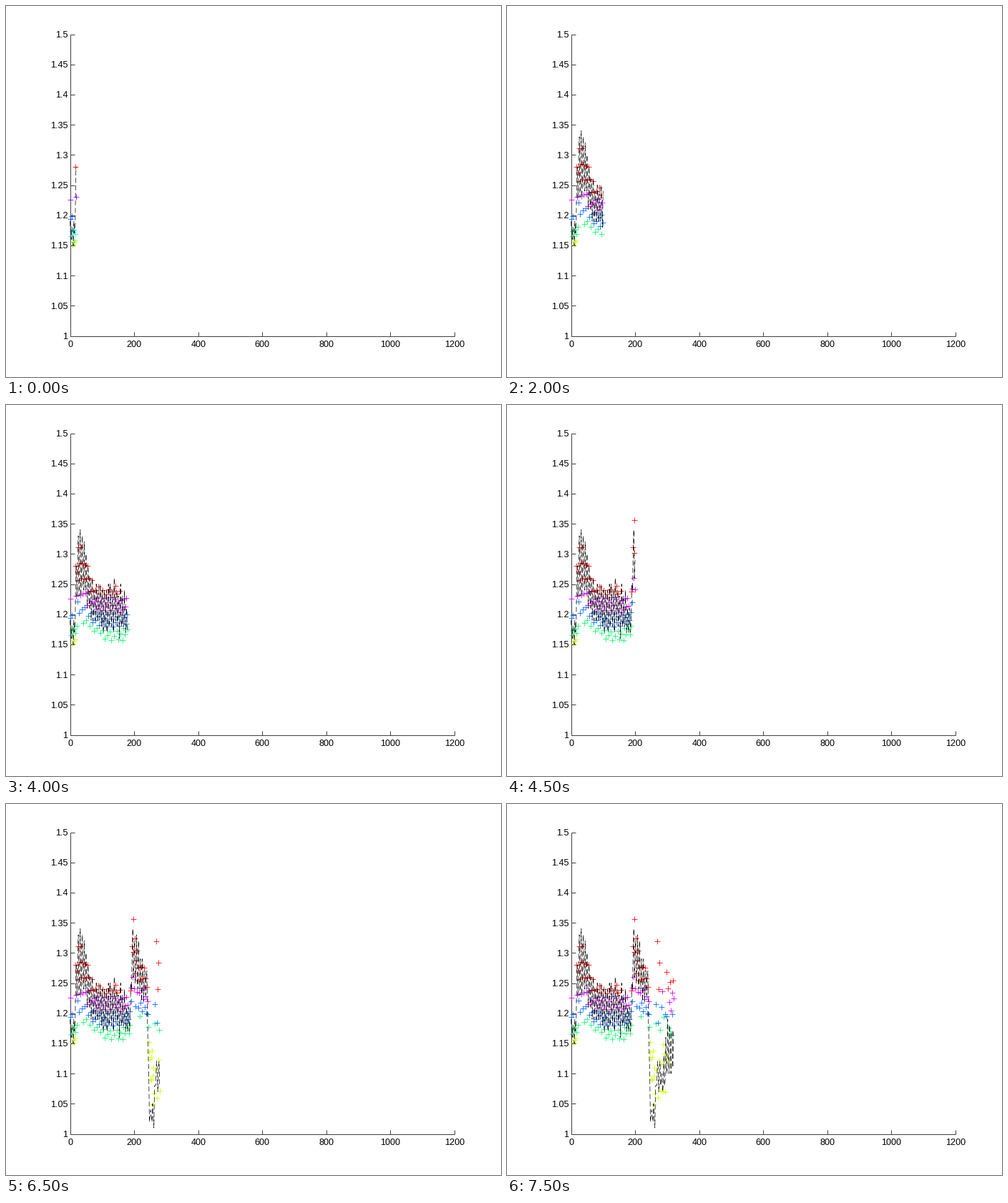
Recreate the animation shown at these times as a matplotlib script. Size 692 px wide and 519 px high, loop 8000 ms.

```python
import numpy as np
import matplotlib.pyplot as plt
from matplotlib.animation import FuncAnimation

W, H, DPI = 692, 519, 64
PT = 72 / DPI                      # points per pixel
FRAMES, INTERVAL, STEP = 16, 500, 20
LEFT, RIGHT, TOP, BOTTOM = 89.5, 626.5, 39.5, 461.5
AXIS = "#404040"
GOLDEN = (5 ** 0.5 - 1) / 2

# Colours from the lowest group of marks to the highest
PALETTE = ["#ccff00", "#00ff66", "#0066ff", "#cc00ff", "#ff0000"]
FIRST_PALETTE = ["#80ff00", "#00ffff", "#0040ff", "#8000ff", "#ff0000"]
LEVELS = [1.145, 1.178, 1.202, 1.23]

# Key points: x, then low and high of the line, low and high of the marks
KEYS = np.array([
    (0, 1.16, 1.19, 1.155, 1.227),
    (15, 1.14, 1.19, 1.14, 1.17),
    (17, 1.22, 1.28, 1.17, 1.31),
    (26, 1.23, 1.35, 1.19, 1.33),
    (48, 1.22, 1.32, 1.175, 1.29),
    (76, 1.17, 1.25, 1.17, 1.25),
    (120, 1.17, 1.26, 1.155, 1.245),
    (150, 1.16, 1.26, 1.15, 1.25),
    (188, 1.15, 1.22, 1.165, 1.22),
    (192, 1.23, 1.33, 1.20, 1.34),
    (198, 1.25, 1.35, 1.21, 1.36),
    (212, 1.21, 1.32, 1.19, 1.30),
    (240, 1.23, 1.28, 1.195, 1.265),
    (248, 1.02, 1.04, 1.11, 1.165),
    (262, 1.01, 1.06, 1.02, 1.14),
    (268, 1.08, 1.13, 1.05, 1.39),
    (288, 1.06, 1.11, 1.03, 1.21),
    (298, 1.07, 1.19, 1.08, 1.285),
    (320, 1.11, 1.20, 1.18, 1.255),
])


def px(x):
    return LEFT + np.asarray(x) * (RIGHT - LEFT) / 1200


def py(y):
    return BOTTOM - (np.asarray(y) - 1) * (BOTTOM - TOP) / 0.5


def band(x, column):
    return (np.interp(x, KEYS[:, 0], KEYS[:, column]),
            np.interp(x, KEYS[:, 0], KEYS[:, column + 1]))


def make_line():
    """Fast oscillation with random swing between low and high."""
    rng = np.random.default_rng(4)
    x = np.arange(0, FRAMES * STEP + 1, 2)
    low, high = band(x, 1)
    swing = np.cos(2 * np.pi * x / 6.3) * rng.uniform(0.5, 1.2, x.size)
    mix = np.clip(0.5 + 0.5 * swing, 0, 1)
    return x, np.round(low + (high - low) * mix, 2)


def make_marks():
    """Marks spread evenly over their band, grouped by height."""
    x = np.arange(0, FRAMES * STEP + 1, 1.6)
    low, high = band(x, 3)
    y = low + (high - low) * ((0.98 + GOLDEN * np.arange(x.size)) % 1)
    lift = 0.4 * np.abs((low + high) / 2 - 1.2)
    return x, y, np.digitize(y - lift, LEVELS)


fig = plt.figure(figsize=(W / DPI, H / DPI), dpi=DPI, facecolor="white")
ax = fig.add_axes([0, 0, 1, 1])
ax.set(xlim=(0, W), ylim=(H, 0))
ax.axis("off")


def stroke(xs, ys):
    ax.plot(xs, ys, color=AXIS, lw=PT, zorder=1, solid_capstyle="butt")


def label(x, y, text, align):
    ax.text(x, y, text, family="Liberation Sans", size=12.6 * PT,
            color="black", ha=align, va="baseline")


def draw_axes():
    stroke([LEFT, LEFT], [TOP, BOTTOM])
    stroke([LEFT, RIGHT], [BOTTOM, BOTTOM])
    for v in range(0, 1201, 200):
        stroke([px(v)] * 2, [BOTTOM, BOTTOM - 5.5])
        label(px(v) + 0.3, 477, str(v), "center")
    for v in np.linspace(1, 1.5, 11):
        stroke([LEFT, LEFT + 6], [py(v)] * 2)
        label(86.5, py(v) + 4.5, f"{v:.3g}", "right")


draw_axes()
line_x, line_y = make_line()
mark_x, mark_y, group = make_marks()
plots = [ax.plot([], [], "+", ms=8 * PT, mew=0.8 * PT, zorder=2)[0]
         for _ in PALETTE]
trace, = ax.plot([], [], color="black", lw=0.7 * PT, zorder=3,
                 dashes=(10, 5), dash_capstyle="butt")


def update(i):
    end = STEP * (i + 1)
    colors = FIRST_PALETTE if i == 0 else PALETTE
    for k, (plot, color) in enumerate(zip(plots, colors)):
        shown = (group == k) & (mark_x <= end)
        plot.set_data(px(mark_x[shown]), py(mark_y[shown]))
        plot.set_color(color)
    keep = line_x <= end
    trace.set_data(px(line_x[keep]), py(line_y[keep]))
    return [*plots, trace]


anim = FuncAnimation(fig, update, frames=FRAMES, interval=INTERVAL,
                     init_func=lambda: update(0), repeat=True, blit=False)
plt.show()
```
